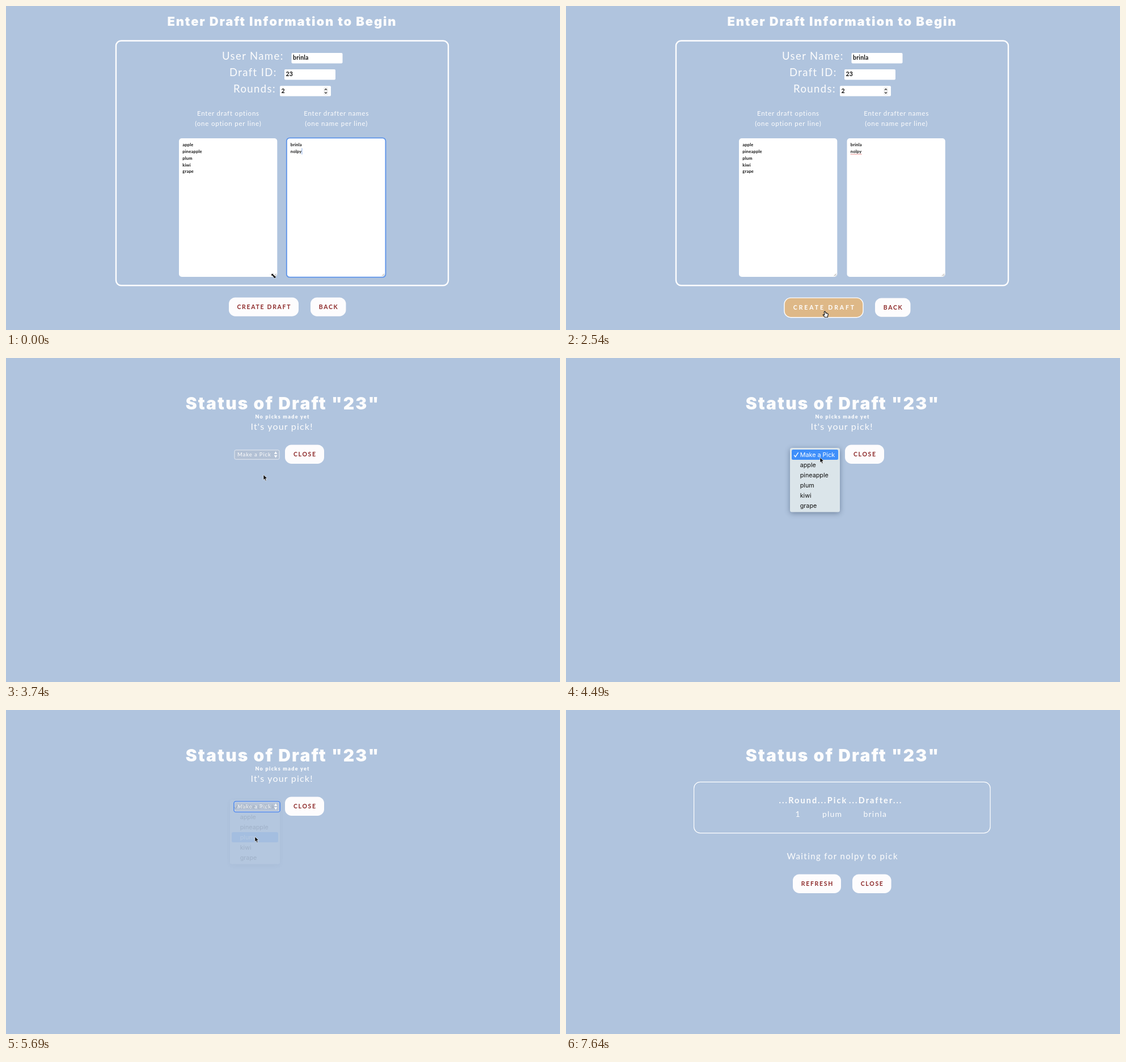
Write an HTML page that moves like this. It is 977x573 px and loops after 8 s.

```html
<!DOCTYPE html>
<html lang="en">
<head>
<meta charset="utf-8">
<title>Draft setup</title>
<style>
  html, body { margin: 0; width: 100%; height: 100%; overflow: hidden; background: #b0c4de; }
  svg { display: block; width: 977px; height: 573px; font-family: Lato, "Open Sans", sans-serif; }
  text { white-space: pre; }
  .title { font-family: Inter, Lato, sans-serif; font-weight: 900; }
  .white { fill: #fdfdfd; }
  .dark { fill: #111; font-weight: 700; }
  .label { font-size: 18.5px; letter-spacing: 1.4px; }
  .field { font-size: 10.5px; letter-spacing: .2px; }
  .area { font-size: 7.5px; letter-spacing: .2px; }
  .button { font-size: 10.5px; font-weight: 700; }
  .head { font-size: 14.5px; font-weight: 700; letter-spacing: 2.1px; }
  .cell { font-size: 14px; letter-spacing: 1.2px; }
  .item { font-family: Inter, "Noto Sans", sans-serif; font-size: 10.8px; }
</style>
</head>
<body>
<svg id="stage" viewBox="0 0 977 573"></svg>
<script>
const LOOP = 8000, STEP = 150;
const USER = 'brinla', RIVAL = 'nolpy';
const OPTIONS = ['apple', 'pineapple', 'plum', 'kiwi', 'grape'];
const BROWN = [142, 43, 43], PAPER = [253, 252, 253], SAND = [222, 184, 135], WHITE = [255, 255, 255];

// time, x, y of the pointer's hot spot
const POINTER = [
  [0, 472, 477.5], [900, 483, 518], [1050, 482, 526], [1650, 456.5, 540], [2850, 456.5, 540],
  [3000, 481, 475], [3150, 493, 390], [3300, 471, 300], [3450, 471, 300], [3600, 461, 240],
  [3900, 447, 173], [4350, 447, 173], [4500, 448, 176], [5100, 439, 224], [6150, 439, 224],
  [6300, 418, 180], [6450, 402, 124], [6600, 440, 81], [6750, 501, 127], [7050, 501, 127],
  [7200, 520, 100], [7350, 558, 54], [7500, 581, 3]
];

const stage = document.getElementById('stage');

function add(parent, tag, attrs = {}, content) {
  const node = document.createElementNS('http://www.w3.org/2000/svg', tag);
  set(node, attrs);
  if (content !== undefined) node.textContent = content;
  return parent.appendChild(node);
}
function set(node, attrs) {
  for (const key in attrs) node.setAttribute(key, attrs[key]);
}
const group = parent => add(parent, 'g');
const show = (node, on) => { node.style.display = on ? '' : 'none'; };
const text = (parent, x, y, content, cls, attrs) =>
  add(parent, 'text', { x, y, class: cls, ...attrs }, content);
const centered = (parent, y, content, size, spacing, cls, x = 487) =>
  text(parent, x + spacing / 2, y, content, cls,
    { 'text-anchor': 'middle', 'font-size': size, 'letter-spacing': spacing });
const box = (parent, x, y, width, height, rx, attrs) =>
  add(parent, 'rect', { x, y, width, height, rx, ...attrs });
const path = (parent, d, attrs) => add(parent, 'path', { d, ...attrs });
const outline = (color, width) => ({ fill: 'none', stroke: color, 'stroke-width': width });

function makeButton(parent, caption) {
  const rect = add(parent, 'rect', { rx: 11.5 });
  const label = add(parent, 'text', { class: 'button', 'text-anchor': 'middle' }, caption);
  return { rect, label };
}
const mix = (a, b, p) => `rgb(${a.map((v, i) => Math.round(v + (b[i] - v) * p))})`;

function placeButton({ rect, label }, x, y, width, height = 33.4, hover = 0) {
  const spacing = 1.7 + 1.2 * hover;
  set(rect, { x, y, width, height, fill: mix(PAPER, SAND, hover),
    stroke: '#fff', 'stroke-width': 1.4 * hover });
  set(label, { x: x + width / 2 + spacing / 2, y: y + height / 2 + 3.7,
    'letter-spacing': spacing, fill: mix(BROWN, WHITE, hover) });
}

// Setup form
const form = group(stage);
centered(form, 35, 'Enter Draft Information to Begin', 22, 1.8, 'title white', 486);
box(form, 194, 61.5, 586, 432.7, 9, outline('#fff', 2.4));

[['User Name:', 381, 503.5, 83, USER], ['Draft ID:', 394, 491, 112, '23'], ['Rounds:', 401, 483, 141.2, '2']]
  .forEach(([name, x, fieldX, y, value]) => {
    text(form, x, y + 12, name, 'label white');
    box(form, fieldX, y, 90, 18.4, 2, { fill: '#fff' });
    text(form, fieldX + 2.5, y + 12.3, value, 'field dark');
  });
box(form, 560, 143.5, 8, 14, 2, { fill: '#f0f0f0' });
path(form, 'M562 148.6l2-2 2 2M562 152.4l2 2 2-2', outline('#222', 1.1));

[['Enter draft options', '(one option per line)', 391.5, 305, OPTIONS],
 ['Enter drafter names', '(one name per line)', 582.3, 495.5, [USER, RIVAL]]]
  .forEach(([first, second, center, x, lines]) => {
    centered(form, 194, first, 11.5, 0.8, 'white', center);
    centered(form, 211.7, second, 11.5, 0.8, 'white', center);
    box(form, x, 234, 173.3, 245, 5, { fill: '#fff' });
    path(form, `M${x + 167.5} 477.5l4-4M${x + 170} 477.5l2-2`, outline('#777', 0.7));
    lines.forEach((line, i) => text(form, x + 6.3, 248.4 + i * 11.7, line, 'area dark'));
  });
const areaFocus = box(form, 494.8, 233.3, 174.7, 246.4, 5.5, outline('#5f95ea', 1.8));
const caret = box(form, 521.3, 251.5, 1.2, 11, 0, { fill: '#3473d8' });
const spelling = path(form, 'M502 262.2h20', { ...outline('#e0524d', 1), 'stroke-dasharray': '1.2 .8' });
const create = makeButton(form, 'CREATE DRAFT');
const back = makeButton(form, 'BACK');

// Draft status
const status = group(stage);
centered(status, 91, 'Status of Draft "23"', 30, 2.1, 'title white');

const picking = group(status);
centered(picking, 106.5, 'No picks made yet', 9, 1.3, 'white').style.fontWeight = 900;
centered(picking, 127, "It's your pick!", 16, 1.2, 'white', 486);
box(picking, 403, 162.8, 79, 16.4, 2.5, { fill: '#b3c1d5', stroke: '#e6ebf2', 'stroke-width': 1 });
text(picking, 408, 174, 'Make a Pick', 'white', { 'font-size': 9.5, 'letter-spacing': 0.9 });
path(picking, 'M472.8 169.8l2.8-4.6 2.8 4.6zM472.8 172l2.8 4.6 2.8-4.6z', { fill: '#fff' });
const selectFocus = box(picking, 402, 161.6, 81, 18.8, 3.5, outline('#5088ec', 1.8));
placeButton(makeButton(picking, 'CLOSE'), 492, 153.5, 69);

const menu = group(picking);
box(menu, 395, 159, 88, 113.5, 3.5, { fill: '#dbe5ea',
  style: 'filter:drop-shadow(0 2px 5px rgba(30,50,80,.45))' });
const highlight = box(menu, 398, 162, 82, 18, 2.5, { fill: '#3f8ffa' });
const check = path(menu, 'M402.2 171.8l2.4 3 5-7.6', outline('#fff', 1.4));
const items = ['Make a Pick', ...OPTIONS].map((name, i) => text(menu, 412.7, 175.3 + i * 18, name, 'item'));

const picked = group(status);
box(picked, 225.6, 127.4, 522.6, 90.2, 11, outline('#fff', 1.2));
text(picked, 375.5, 165, '...Round', 'head white');
text(picked, 444, 165, '...Pick', 'head white');
text(picked, 499, 165, '...Drafter...', 'head white');
text(picked, 404.5, 189, '1', 'cell white');
text(picked, 452, 189, 'plum', 'cell white');
text(picked, 524.5, 189, USER, 'cell white');
centered(picked, 264, `Waiting for ${RIVAL} to pick`, 15, 1.4, 'white');
placeButton(makeButton(picked, 'REFRESH'), 400, 290.5, 85);
placeButton(makeButton(picked, 'CLOSE'), 505, 290.5, 68.6);

// Pointer shapes, each drawn around its hot spot
const pointer = group(stage);
const resize = path(pointer, 'M-3.2-4h3.4l-1.2 1.2 3.4 3.4 1.2-1.2v4.2H-.6l1.2-1.2-3.4-3.4-1.2 1.2v-3.4z',
  { fill: '#000', stroke: '#fff', 'stroke-width': 0.5 });
const arrow = path(pointer, 'M0 0v9.2l2.1-2 1.5 3.5 1.6-.7-1.5-3.4h3z',
  { fill: '#000', stroke: '#fff', 'stroke-width': 0.7 });
const hand = path(pointer,
  'M-1.2 1Q0-.7 1 1L1.5 3.2Q2.7 2.4 3.2 3.6 4.4 3 4.7 4.2 6 4 5.8 5.6L5 8.4V10.3H-.2L-3.2 6.3Q-2.7 5-.5 6.4z',
  { fill: '#fff', stroke: '#111', 'stroke-width': 1.1 });

function pointerAt(time) {
  const next = POINTER.findIndex(key => key[0] > time);
  if (next < 0) return POINTER[POINTER.length - 1].slice(1);
  const [t0, x0, y0] = POINTER[next - 1], [t1, x1, y1] = POINTER[next];
  const p = (time - t0) / (t1 - t0);
  return [x0 + (x1 - x0) * p, y0 + (y1 - y0) * p];
}

function render(now) {
  const t = Math.floor((now % LOOP + 12) / STEP) * STEP;
  const [x, y] = pointerAt(t);

  show(form, t < 2700);
  show(status, t >= 2700);
  show(picking, t < 5850);
  show(picked, t >= 5850);

  const hover = Math.min(1, Math.max(0, (t - 950) / 300));
  placeButton(create, 393 - 8 * hover, 515.5 + 0.6 * hover, 123 + 16 * hover, 33.2 + 1.4 * hover, hover);
  placeButton(back, 537 + 8 * hover, 515.5 + hover, 62.5, 33.2);

  const focused = t < 2550;
  show(areaFocus, focused);
  show(spelling, !focused);
  show(caret, focused && Math.floor((t + 150) / 600) % 2 === 0);
  set(caret, { opacity: t === 0 ? 0.5 : 1 });

  show(menu, t >= 4050);
  set(menu, { opacity: t < 5700 ? 1 : 0.1 });
  show(selectFocus, t >= 5700);
  const active = Math.min(5, Math.max(0, Math.floor((y - 162) / 18)));
  set(highlight, { y: 162 + active * 18 });
  set(check, { stroke: active ? '#111' : '#fff' });
  items.forEach((item, i) => set(item, { fill: i === active ? '#fff' : '#111' }));

  set(pointer, { transform: `translate(${x} ${y})` });
  show(pointer, t < 7650);
  const onButton = t >= 1050 && t < 3000;
  show(resize, t < STEP);
  show(hand, onButton);
  show(arrow, t >= STEP && !onButton);
}

const start = performance.now();
function tick() {
  render(performance.now() - start);
  requestAnimationFrame(tick);
}
tick();
</script>
</body>
</html>
```
